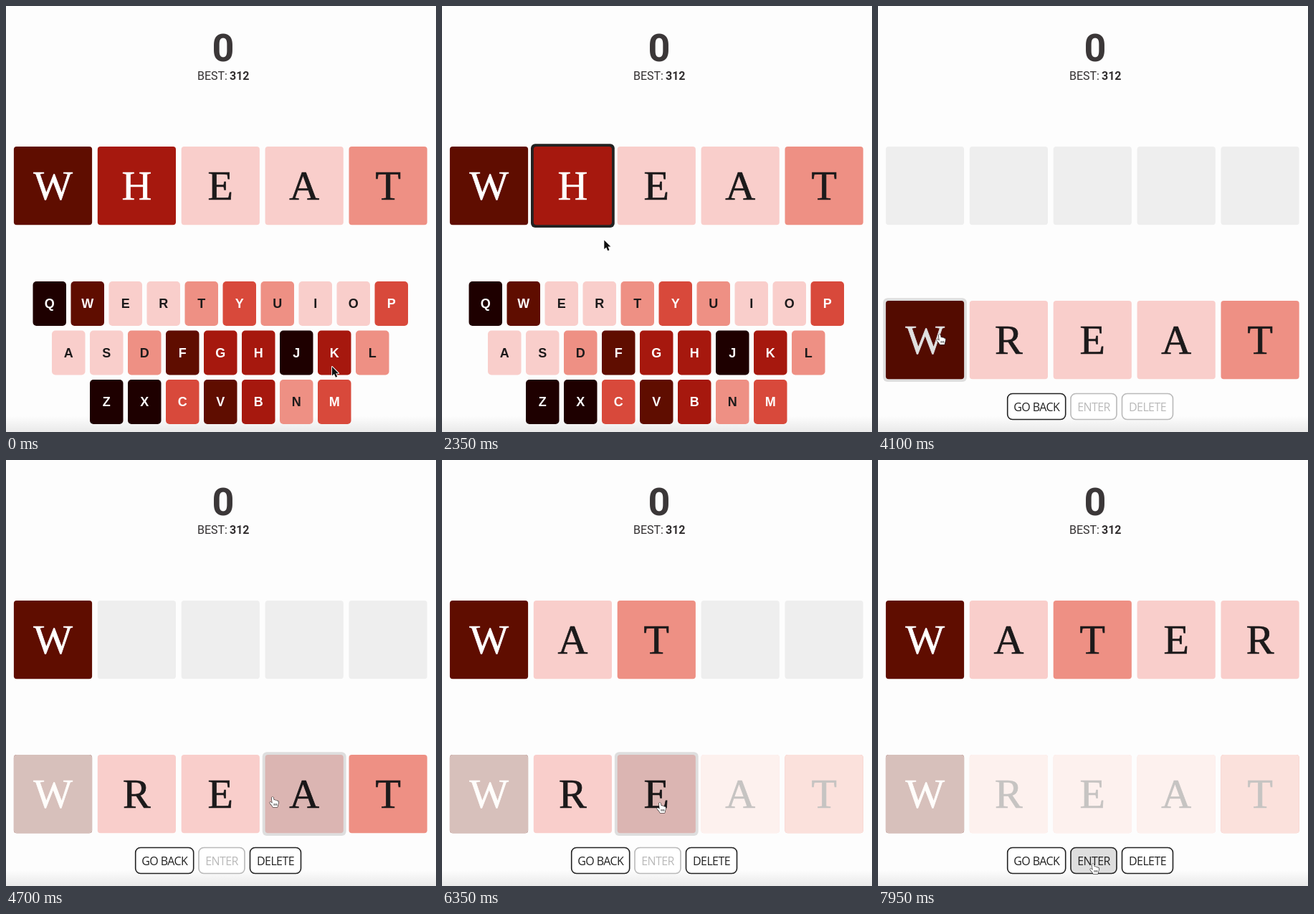
Write an HTML page with a canvas that moves like this. It is 600 px wide and 594 px high and loops after 8000 ms.

```html
<!DOCTYPE html>
<html lang="en">
<head>
<meta charset="utf-8">
<title>Letter swap word game</title>
<style>
  html, body { margin: 0; width: 100%; height: 100%; overflow: hidden; background: #fdfdfd; }
  canvas { display: block; }
</style>
</head>
<body>
<canvas width="600" height="594"></canvas>
<script>
const ctx = document.querySelector('canvas').getContext('2d');
const LOOP = 8000;
const BACKGROUND = '#fdfdfd', INK = '#222', HOVER_RING = '#dedede', HOVER_SHADE = 'rgba(0,0,0,.12)';
const SHADES = ['#1e0000', '#5f0d00', '#a6180e', '#d8493b', '#ee9084', '#f9cecb'];
const SHADE_GROUPS = ['QJZX', 'WFV', 'GHKB', 'YPCM', 'TUDLN', 'ERIOAS'];
const KEY_ROWS = ['QWERTYUIOP', 'ASDFGHJKL', 'ZXCVBNM'];
const KEY = { w: 46.5, h: 62 };
const TILE = 109.2, TOP_ROW = 196, LOWER_ROW = 411;

// The pointer rests on each spot while clicking and glides in between.
const START = { at: 0, x: 455, y: 503 };
const SELECT = { at: 1600, x: 225, y: 271 };
const SWAP = { at: 3300, x: 228, y: 398 };
const PICKS = [
  { at: 4200, x: 86, y: 458 },
  { at: 4850, x: 372, y: 470 },
  { at: 5600, x: 510, y: 476 },
  { at: 6500, x: 304, y: 478 },
  { at: 7200, x: 199, y: 480 },
];
const SUBMIT = { at: 8100, x: 300, y: 563 };
const CLICKS = [START, SELECT, SWAP, ...PICKS, SUBMIT];
const REST_BEFORE = 200, REST_AFTER = 120;

const ARROW = new Path2D('M0 0V12.6L2.9 10 5 14.8 7.2 13.8 5.2 9.2H9.1Z');
const HAND = new Path2D('M-1.3 1C-1.3-.4 1-.4 1.2 1L1.9 4.6C2.3 3.7 4 3.9 4.2 5 4.7 4.3 6.2 4.6 6.3 5.7' +
  ' 7 5.1 8.2 5.6 8.2 6.8 8.3 9.5 7 11 6.7 14H.3C0 12-3.6 9.6-3.9 8-4 6.8-2.4 6.6-1.7 7.6L-.4 8.8Z');
const KNUCKLES = new Path2D('M2 9V11.8M3.8 9V11.8M5.6 9V11.8');

function pointerAt(t) {
  const next = CLICKS.findIndex(click => click.at > t);
  const from = CLICKS[next - 1], to = CLICKS[next];
  const leave = from.at + REST_AFTER, arrive = to.at - REST_BEFORE;
  const u = Math.min(1, Math.max(0, (t - leave) / (arrive - leave)));
  const ease = u * u * (3 - 2 * u);
  return { x: from.x + (to.x - from.x) * ease, y: from.y + (to.y - from.y) * ease };
}

const tileX = i => 10.9 + 116.9 * i;
const tileIndex = x => Math.floor((x - tileX(0)) / 116.9);
const shadeOf = letter => SHADE_GROUPS.findIndex(group => group.includes(letter));
const inside = (p, x, y, w, h) => p.x >= x && p.x <= x + w && p.y >= y && p.y <= y + h;

function box(x, y, w, h, radius, fill) {
  ctx.beginPath();
  ctx.roundRect(x, y, w, h, radius);
  ctx.fillStyle = fill;
  ctx.fill();
}

function text(string, x, y, font, color, align = 'center') {
  ctx.font = font;
  ctx.textAlign = align;
  ctx.fillStyle = color;
  ctx.fillText(string, x, y);
}

function letterBox(letter, x, y, w, h, radius, font, baseline, weight = 0) {
  const shade = shadeOf(letter), color = shade > 3 ? '#1c1a1b' : '#fff';
  box(x, y, w, h, radius, SHADES[shade]);
  text(letter, x + w / 2, y + baseline, font, color);
  if (weight) {
    ctx.lineWidth = weight;
    ctx.strokeStyle = color;
    ctx.strokeText(letter, x + w / 2, y + baseline);
  }
}

function tile(letter, i, y, { ring, hover, faded } = {}) {
  const x = tileX(i);
  if (ring) box(x - 3.8, y - 3.8, TILE + 7.6, TILE + 7.6, 6, ring);
  if (!letter) return box(x, y, TILE, TILE, 4, '#eee');
  letterBox(letter, x, y, TILE, TILE, 4, '58px "Liberation Serif", serif', 74, 0.7);
  if (hover) box(x, y, TILE, TILE, 4, HOVER_SHADE);
  if (faded) box(x, y, TILE, TILE, 4, 'rgba(255,252,250,.75)');
}

function button(label, x, w, enabled, hover) {
  const color = enabled ? INK : '#b9b9b9';
  box(x, 540.5, w, 36, 7, hover ? '#dedede' : '#fff');
  ctx.strokeStyle = color;
  ctx.lineWidth = 1.6;
  ctx.stroke();
  ctx.letterSpacing = '-0.6px';
  text(label, x + w / 2, 564.7, '16px "Open Sans", sans-serif', color);
  ctx.letterSpacing = '0px';
}

// Both scenes return whether the hand pointer is shown.
function keyboardScene(t, pointer) {
  const selected = t >= SELECT.at;
  let hand = false;
  [...'WHEAT'].forEach((letter, i) => {
    const hover = inside(pointer, tileX(i), TOP_ROW, TILE, TILE);
    const ring = selected && i === tileIndex(SELECT.x) ? INK : hover && HOVER_RING;
    tile(letter, i, TOP_ROW, { hover, ring });
  });
  KEY_ROWS.forEach((letters, row) => {
    const y = 384 + 68.5 * row;
    [...letters].forEach((letter, i) => {
      const x = 302.5 - 26.5 * KEY_ROWS[0].length + 26.5 * (row + (row > 1)) + 53 * i;
      letterBox(letter, x, y, KEY.w, KEY.h, 5, 'bold 18px "Liberation Sans", sans-serif', 37);
      if (selected && inside(pointer, x, y, KEY.w, KEY.h)) {
        box(x, y, KEY.w, KEY.h, 5, HOVER_SHADE);
        hand = true;
      }
    });
  });
  return hand;
}

function spellingScene(t, pointer) {
  const word = 'WREAT';
  const picked = PICKS.filter(pick => t >= pick.at).map(pick => tileIndex(pick.x));
  let hand = false;
  for (let i = 0; i < word.length; i++) {
    const faded = picked.includes(i);
    const hover = !faded && inside(pointer, tileX(i), LOWER_ROW, TILE, TILE);
    tile(word[picked[i]], i, TOP_ROW);
    tile(word[i], i, LOWER_ROW, { faded, hover, ring: hover && HOVER_RING });
    hand ||= hover;
  }
  const complete = picked.length === word.length;
  const enterHover = complete && inside(pointer, 269, 540, 64, 37);
  button('GO BACK', 180.7, 81, true);
  button('ENTER', 269, 64, complete, enterHover);
  button('DELETE', 340.5, 71, picked.length > 0);
  return hand || enterHover;
}

function drawPointer({ x, y }, hand) {
  const shape = hand ? HAND : ARROW;
  ctx.save();
  ctx.translate(x, y);
  ctx.lineJoin = 'round';
  ctx.lineWidth = hand ? 1.1 : 1.8;
  ctx.strokeStyle = hand ? '#111' : '#fff';
  ctx.fillStyle = hand ? '#fff' : '#111';
  ctx.stroke(shape);
  ctx.fill(shape);
  if (hand) {
    ctx.lineWidth = 0.7;
    ctx.stroke(KNUCKLES);
  }
  ctx.restore();
}

function draw(t) {
  ctx.fillStyle = BACKGROUND;
  ctx.fillRect(0, 0, 600, 594);
  const shadow = ctx.createLinearGradient(0, 572, 0, 594);
  shadow.addColorStop(0, BACKGROUND);
  shadow.addColorStop(1, '#e9e9e9');
  ctx.fillStyle = shadow;
  ctx.fillRect(0, 572, 600, 22);

  text('0', 303, 77, 'bold 54px Roboto, sans-serif', '#3b3738');
  text('BEST: ', 267, 103, '16px Roboto, sans-serif', '#333031', 'left');
  text('312', 339.5, 103, 'bold 16px Roboto, sans-serif', '#333031', 'right');

  const pointer = pointerAt(t);
  const scene = t < SWAP.at ? keyboardScene : spellingScene;
  drawPointer(pointer, scene(t, pointer));
}

function frame() {
  draw(performance.now() % LOOP);
  requestAnimationFrame(frame);
}
frame();
</script>
</body>
</html>
```
